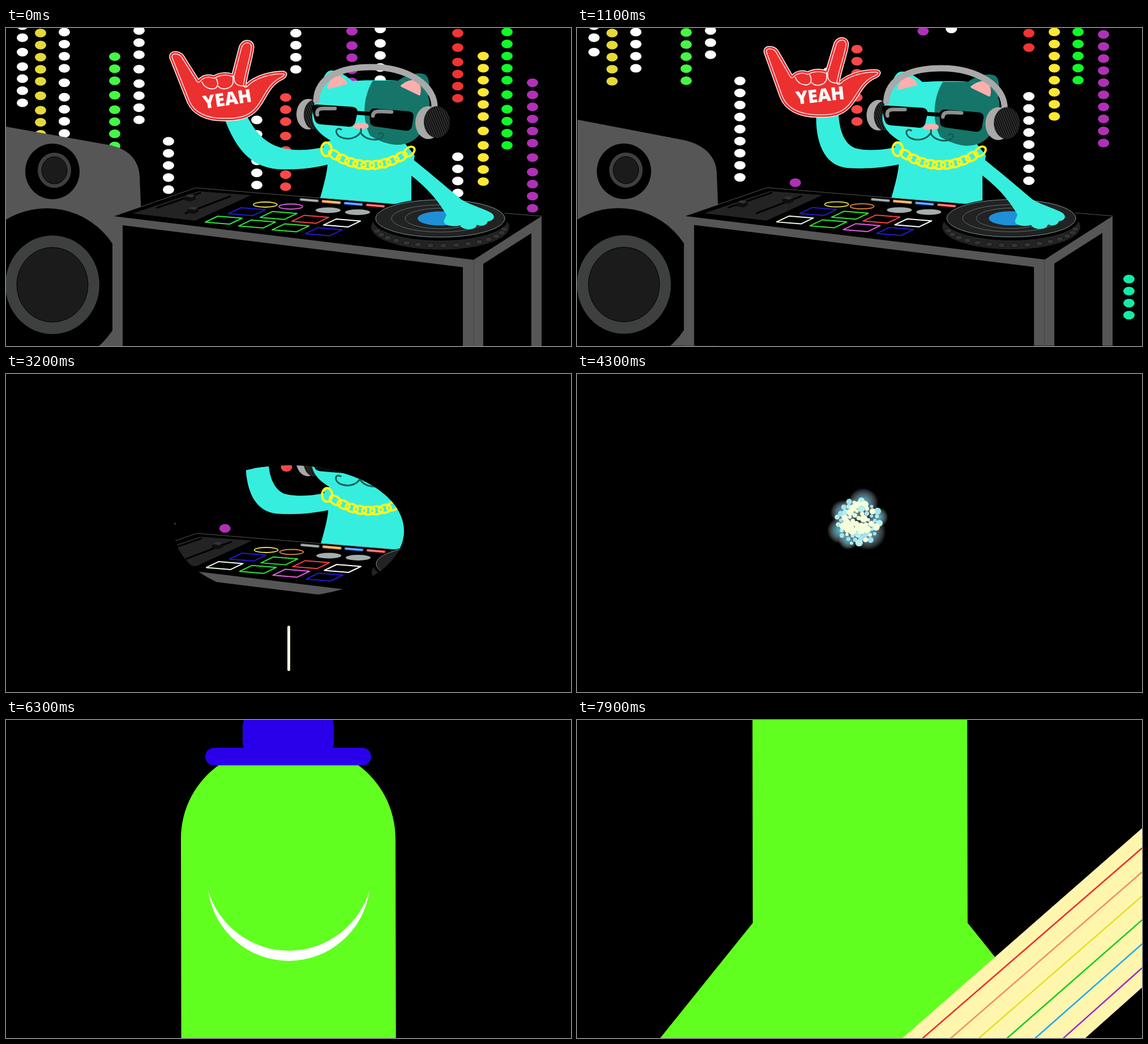
An HTML page with a canvas for the animation above (8000 ms loop, 998 by 561 pixels).

```html
<!DOCTYPE html>
<html lang="en">
<head>
<meta charset="utf-8">
<title>Party night</title>
<style>
html, body { margin: 0; width: 100%; height: 100%; overflow: hidden; background: #000; }
canvas { display: block; }
</style>
</head>
<body>
<canvas id="stage" width="998" height="561"></canvas>
<script>
const W = 998, H = 561, LOOP = 8000, STEP = 100, BEAT = 700;
const c = document.getElementById('stage').getContext('2d');
const CYAN = '#36eede', DARK = '#157569', GREY = '#565656', PINK = '#ffaeae', GREEN = '#61ff1f';
const PURPLE = '#b030b8', WHITE = '#fff';
const clamp = (v, a = 0, b = 1) => Math.min(b, Math.max(a, v));
const mix = (a, b, q) => a + (b - a) * q;
const noise = n => { const v = Math.sin(n * 127.1 + 3) * 43758.5; return v - Math.floor(v); };

function paint(p, fill, stroke, width = 1) {
  if (fill) { c.fillStyle = fill; c.fill(p); }
  if (stroke) { c.strokeStyle = stroke; c.lineWidth = width; c.stroke(p); }
}
const path = (d, fill, stroke, width) => paint(new Path2D(d), fill, stroke, width);
function ellipse(x, y, rx, ry, fill, stroke, width, turn = 0) {
  const p = new Path2D();
  p.ellipse(x, y, rx, ry, turn, 0, 7);
  paint(p, fill, stroke, width);
}
const disc = (x, y, r, fill) => ellipse(x, y, r, r, fill);
function box(x, y, w, h, r, fill) {
  const p = new Path2D();
  p.roundRect(x, y, w, h, r);
  paint(p, fill);
}
function group(draw) { c.save(); draw(); c.restore(); }

// A hanging string of dots; the lit part climbs with the beat, faster lower down.
function lights(q) {
  const rise = y => y - (75 + 0.14 * y) * q;
  const string = (x, color, end, top = 0) => {
    for (let k = 0; k < 16; k++) {
      const y = end - 21.3 * k - 4.2 * clamp(k - 3, 0, 2);
      if (y >= rise(top) - 9 && y <= rise(end) + 8) ellipse(x, y, 10, 7.6, color);
    }
  };
  string(29, WHITE, 132);
  string(61, '#e6d93a', 209);
  string(103, WHITE, 186);
  string(192, '#46f746', 208, 52);
  string(235, WHITE, 162);
  string(287, WHITE, 400, 200);
  string(385, PURPLE, 452, 405);
  string(443, WHITE, 277, 171);
  string(494, '#f94848', 280, 122);
  string(512, WHITE, 73);
  string(611, PURPLE, 95);
  string(661, WHITE, 91);
  string(798, '#f03434', 124);
  string(798, WHITE, 406, 225);
  string(843, '#ffe733', 271, 49);
  string(885, '#12f929', 207);
  string(930, PURPLE, 318, 96);
  string(975, '#14eba9', 686, 598);
}

function speaker(up) {
  path(up ? 'M0 162 L188 198 C225 206 245 228 246 255 L249 330 L249 561 H0Z'
          : 'M0 174 L180 206 C215 212 235 232 236 262 L239 330 V561 H0Z', GREY);
  ellipse(82, 253, 48, 49, '#000');
  ellipse(85.5, 251, 29.5, 31, '#3e4040');
  ellipse(85.5, 251, 22.5, 24, '#1b1b1b', '#000', 1);
  disc(72, 457, 139, '#000');
  ellipse(82, 453, 83, 87, '#3e4040');
  ellipse(82, 453, 63, 66, '#1b1b1b', '#000', 1);
}

function hand() {
  const shape = new Path2D('M290 53 C287 39 307 40 313 49 L340 92 C346 84 358 81 367 85 C377 79 391 78 400 82 ' +
    'L412 36 C415 19 436 18 437 33 C437 45 427 75 423 101 C440 83 470 77 490 77 C499 79 495 87 486 91 ' +
    'C467 101 462 117 450 135 C437 156 419 163 388 163 C352 164 330 151 321 131Z');
  paint(shape, null, WHITE, 3);
  paint(shape, '#ec3030');
  group(() => {
    c.clip(shape);
    paint(shape, null, WHITE, 8.5);
    paint(shape, null, '#ec3030', 6);
  });
  path('M346 95 C349 103 358 109 368 107 C376 104 375 95 371 89 M375 103 C382 111 398 107 401 97 V84 ' +
    'M403 86 C402 96 406 104 425 102', null, WHITE, 1.6);
  group(() => {
    c.translate(391, 127);
    c.rotate(-0.15);
    c.font = '800 32px "Open Sans", sans-serif';
    c.textAlign = 'center';
    c.textBaseline = 'middle';
    c.fillStyle = WHITE;
    c.fillText('YEAH', 0, 1);
  });
}

function body(up) {
  path('M554 303 C562 275 568 252 568 238 L560 205 L600 185 H690 L722 225 L716 260 V320 H554Z', CYAN);
  path(up ? 'M572 208 C545 216 510 218 490 212 C470 203 463 180 461 148 L422 150 C420 200 435 242 475 247 C510 250 545 246 572 240Z'
          : 'M572 208 C530 218 495 218 470 205 C450 195 435 175 424 152 L386 160 C405 210 430 245 480 249 C515 251 545 247 572 240Z', CYAN);
  group(() => {
    if (up) {
      c.translate(429, 121);
      c.rotate(0.035);
      c.translate(-391, -127);
    }
    hand();
  });
}

function hatch(x, y, rx, ry) {
  ellipse(x, y, rx, ry, '#151515');
  group(() => {
    const p = new Path2D();
    p.ellipse(x, y, rx, ry, 0, 0, 7);
    c.clip(p);
    for (let i = -40; i < 40; i += 4) path(`M${x + i - 12} ${y - 30} L${x + i + 12} ${y + 30}`, null, '#404040', 1);
  });
}

function head() {
  ellipse(534, 152, 21, 27, '#a9a9a9');
  hatch(544, 153, 18, 26);
  path('M556 118 C557 92 563 76 574 75 C586 74 602 84 618 99Z', CYAN);
  path('M690 95 C705 82 728 77 740 82 C750 88 749 112 742 132Z', DARK);
  path('M541 160 C541 120 562 96 600 94 C630 92 670 91 692 93 C728 93 748 110 748 136 ' +
    'C746 180 722 206 692 206 L600 212 C570 198 545 185 541 160Z', CYAN);
  path('M648 93 C632 118 627 158 643 190 C658 199 675 206 692 206 C722 206 746 180 748 136 C748 110 728 94 692 93Z', DARK);
  path('M569 106 C570 94 580 86 589 86 C596 88 600 94 601 98Z', PINK, PINK, 3);
  path('M699 102 C707 96 717 92 724 94 C731 99 732 110 730 117Z', PINK, PINK, 4);
  path('M548 128 C550 84 595 69 645 69 C708 69 759 100 757 142', null, '#a9a9a9', 11);
  ellipse(746, 167, 23, 29, '#a9a9a9');
  hatch(761, 166, 23, 28);
  path('M549 135 L612 139 C618 140 621 143 621 148 L617 166 C615 172 611 175 604 174 L556 170 C549 169 546 166 545 161 ' +
    'L540 141 C540 137 543 135 549 135Z M651 142 L711 147 C718 148 720 151 720 156 L717 174 C715 180 711 182 704 181 ' +
    'L654 174 C646 173 643 170 643 165 L642 150 C643 144 646 142 651 142Z M617 146 L645 148 V155 L617 153Z', '#000');
  path('M550 153 C548 146 552 142 560 142 H581 M648 155 C648 149 653 147 660 147 L681 148', null, '#8f8f8f', 6.5);
  path('M614 172 C616 166 638 165 640 171 C642 176 638 178 634 177 L627 180 L620 177 C615 178 612 176 614 172Z', PINK);
  path('M592 179 C582 174 580 186 590 192 C604 199 620 194 626 184 C634 198 655 200 664 193 C670 187 664 183 658 187 M627 178 V186',
    null, '#145e58', 3);
}

function chain() {
  for (let i = 0; i < 11; i++) {
    const x = 566 + 14.6 * i, u = (x - 642) / 76;
    const end = i === 0;
    ellipse(x, 242 - 28 * u * u, end ? 9 : 11, end ? 12 : 7, null, '#fff51e', 4, end ? 0 : -0.72 * u);
  }
}

function fader(x, y) {
  path(`M${x - 10} ${y} l8 -5 l12 2 v6 l-8 4 l-12 -2Z`, '#0e0e0e');
  path(`M${x - 8} ${y - 2} l6 -4 l11 2 l-6 4Z`, '#333');
}

function desk(q, up) {
  path('M190 332 L335 282 L946 332 V561 H206Z', '#000');
  path('M190 332 L335 282 L946 332', null, '#555', 1);
  path('M190 332 L826 409 L946 332 V561 H928 V362 L843 416 V561 H807 V422 L206 348 V561 H188 V333Z', GREY);
  path('M826 409 V561', null, '#444', 1);

  path('M224 327 L340 288 L433 295 L334 340Z', '#232323');
  path('M267 317 L343 291 M317 327 L396 297', null, '#000', 3);
  fader(mix(325, 291, q), mix(299, 310, q));
  fader(mix(330, 372, q), mix(321, 303, q));

  const lime = '#28e83a', blue = '#2418cc', pink = '#e25ce8';
  const pad = (x, y, color) => path(`M${x - 33} ${y + 3.5} l22 -10.5 l43 3.5 l-22 10.5Z`, null, color, 2);
  [up ? '#eeffe6' : lime, lime, up ? pink : lime, blue].forEach((color, i) => pad(385 + 59 * i, 339 + 6.8 * i, color));
  [blue, lime, '#f04040', WHITE].forEach((color, i) => pad(426 + 56 * i, 324 + 6.7 * i, color));
  ellipse(458, 311.5, 21, 4.5, null, '#e8e23a', 1.8);
  ellipse(503, 315, 21, 4.5, null, up ? '#e58a3c' : pink, 1.8);
  ellipse(569, 321.5, 22, 5, '#a4afad');
  ellipse(621, 325, 22, 5, '#a4afad');
  ['#6f7775', '#e09038', '#1e6ee0', '#d02c2c'].forEach((color, i) => {
    const d = `M${521 + 39 * i} ${302.5 + 3.2 * i} l29 2.5`;
    path(d, null, color, 5);
    path(d, null, 'rgba(255,255,255,.6)', 1.8);
  });
}

function turntable() {
  ellipse(767, 351, 122, 40, '#232323');
  for (let a = 0.12; a < 3.1; a += 0.2) ellipse(767 + 114 * Math.cos(a), 351 + 33 * Math.sin(a), 6, 4, '#343434', '#111', 1);
  ellipse(767, 338, 119, 37, '#000');
  ellipse(767, 336, 114, 33, '#222', '#7b9999', 1);
  ellipse(767, 336, 86, 24, null, '#6d8585', 0.8);
  ellipse(767, 336, 62, 18, null, '#6d8585', 0.8);
  ellipse(766, 336, 39, 12.5, '#1f8fd6');
  path('M714 228 C742 250 775 278 800 299 C810 309 840 317 855 325 C866 331 863 340 851 341 C849 350 837 350 832 347 ' +
    'C829 358 806 357 802 348 C790 352 770 348 774 339 L778 330 C760 298 736 276 714 259Z', CYAN);
}

function club(t) {
  const beat = t % BEAT;
  const q = beat <= 400 ? beat / 400 : (BEAT - beat) / 300;
  const up = q >= 0.25 && beat < 550;
  group(() => {
    const k = t * 1e-6;   // slow camera drift
    c.transform(1 - k, 0, 0, 1 - k, 950 * k, 0);
    lights(q);
    speaker(up);
    body(up);
    group(() => {
      c.translate(up ? -2 : 0, 2 * q);
      head();
    });
    chain();
    desk(q, up);
    turntable();
  });
}

function iris(t) {
  const rx = 203 + (3200 - t) * 0.674;
  if (rx <= 0) return;
  group(() => {
    c.beginPath();
    c.ellipse(500, 277, rx, rx * 0.571, 0, 0, 7);
    c.clip();
    club(t);
  });
}

function rocket(t) {
  const y = 561 - 0.585 * (t - 3000);
  const top = Math.max(270, y), end = y + 80;
  if (t >= 3000 && end > top) box(497, top, 5, end - top, 2.5, '#f3f8dc');
}

function glow(x, y, r) {
  const rings = 12;
  for (let i = 0; i < rings; i++) disc(x, y, r * (1 - i / rings), `hsla(192, ${i * 8}%, ${46 + 2 * i}%, .2)`);
}

function puffs(size) {
  const count = 62;
  for (let i = count; i > 0; i--) {
    const a = i * 2.4, d = 82 * Math.sqrt(i / count);
    const r = (6 + 9 * noise(i) ** 2) * size;
    const color = noise(i + 80) > i / count ? '#f4ffdc' : i % 2 ? '#b8f0ea' : '#a6e3f2';
    disc(d * Math.cos(a), d * Math.sin(a) - 8, r, color);
  }
}

function sparks(reach) {
  const rays = 15;
  for (let j = 0; j < rays; j++) {
    const start = 62 + 30 * noise(j), bend = (noise(j + 40) - 0.5) * 0.14;
    for (let k = 0; k < 4; k++) {
      const a = j / rays * 2 * Math.PI + bend * k, d = (start + 16 * k) * reach;
      const x = d * Math.cos(a), y = d * Math.sin(a), r = 3.5 + 3 * noise(4 * j + k);
      disc(x, y, r, 'rgba(190,90,90,.45)');
      disc(x, y, r * 0.65, 'rgba(215,130,130,.6)');
      disc(x, y, r * 0.33, '#ffeaea');
    }
  }
}

function burst(t) {
  const grow = clamp((t - 3650) / 1350);
  const fade = clamp((t - 5300) / 750);
  const fly = clamp((t - 4400) / 700) * (1 + 0.15 * fade);
  if (grow <= 0 || fade >= 1) return;
  group(() => {
    c.translate(497, 265);
    c.globalAlpha = 1 - fade;
    group(() => {
      c.scale(grow, grow);
      glow(18, -77, 54);
      glow(-57, -43, 44);
      glow(-22, -50, 45);
      glow(73, -26, 35);
      glow(-67, 23, 46);
      glow(-37, 57, 35);
      glow(35, 28, 64);
      puffs(1 - fade);
    });
    if (fly > 0) sparks(fly);
  });
}

function hatMan(t) {
  group(() => {
    c.translate(0, (6300 - t) * 0.5);
    path('M309 210 C309 155 336 107 378 78 H620 C661 107 688 155 688 210 L690 1158 L853 1361 V1500 H147 V1361 L310.5 1158Z', GREEN);
    box(418, -25, 161, 100, 38, '#2a00ea');
    box(352, 49, 293, 31, 15.5, '#2a00ea');
    path('M357 301 A143.9 143.9 0 0 0 642 301 A148.8 148.8 0 0 1 357 301Z', WHITE);
  });
  group(() => {
    c.translate(0, (7900 - t) * 0.5);
    path('M998 191 L575 561 L118 961 H449 L898 561 L998 472Z', '#fff6ae');
    ['#f02a2a', '#f58e58', '#e6de1e', '#14c81e', '#18a8ec', '#a828c0'].forEach((color, i) =>
      path(`M998 ${226 + 42.3 * i} L${611 + 49.7 * i} 561`, null, color, 2.5));
  });
}

c.lineCap = 'round';
c.lineJoin = 'round';

function frame() {
  const t = Math.floor(performance.now() % LOOP / STEP) * STEP;
  c.fillStyle = '#000';
  c.fillRect(0, 0, W, H);
  if (t < 6200) {
    iris(t);
    rocket(t);
    burst(t);
  } else {
    hatMan(t);
  }
  requestAnimationFrame(frame);
}
frame();
</script>
</body>
</html>
```
